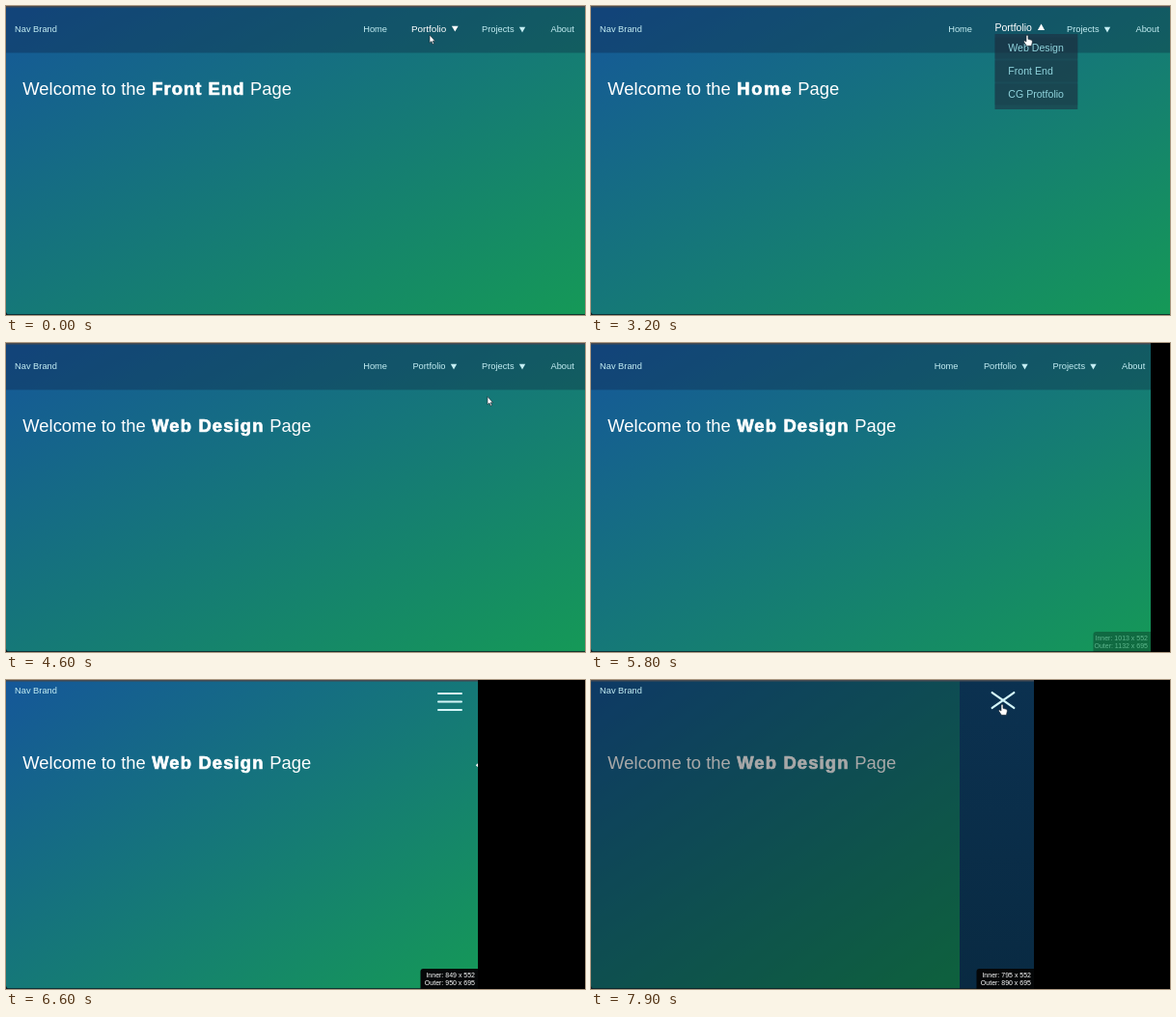
An HTML page that plays this animation: 600x320 px, repeating every 8 s.

```html
<!DOCTYPE html>
<html lang="en">
<head>
<meta charset="utf-8">
<title>Responsive navbar</title>
<style>
  html, body { margin: 0; width: 100%; height: 100%; overflow: hidden; background: #000; }
  svg { display: block; width: 600px; height: 320px; }
  text { font-family: "Liberation Sans", Arial, sans-serif; white-space: pre; }
  .link { font-size: 9.3px; fill: #c4eef4; }
  .sub { font-size: 10.6px; fill: #8fd3dc; }
  .title { font-size: 18.4px; fill: #fff; }
  .black { font-weight: 700; stroke: #fff; stroke-width: .7px; }
  .size { font-size: 7px; fill: #fff; text-anchor: end; }
</style>
</head>
<body>
<svg viewBox="0 0 600 320" id="stage">
  <defs>
    <linearGradient id="sky" x1="0" y1="0" x2="1" y2="1">
      <stop offset="0" stop-color="#155799"/><stop offset="1" stop-color="#159957"/>
    </linearGradient>
    <linearGradient id="navy" x1="0" y1="0" x2="0" y2="1">
      <stop offset="0" stop-color="#0b3150"/><stop offset="1" stop-color="#092a42"/>
    </linearGradient>
  </defs>
  <g id="page">
    <rect id="bg" height="320" fill="url(#sky)"/>
    <g class="title">
      <text x="17.3" y="92">Welcome to the </text>
      <text id="name" class="black" x="151.2" y="92"></text>
      <text id="tail" y="92">Page</text>
    </g>
    <rect id="shade" height="320" fill="#000"/>
    <rect id="panel" height="320" width="220" fill="url(#navy)"/>
    <rect id="bar" height="48.5" fill="#0c1432" fill-opacity=".3"/>
    <text id="brand" class="link" x="9">Nav Brand</text>
    <g id="drop">
      <rect x="418.5" y="29" width="85.8" height="78" fill="#20283c" fill-opacity=".55"/>
      <g id="rows"></g>
    </g>
    <g id="links"></g>
    <g id="burger" stroke="#d4f6f8" stroke-width="2" stroke-linecap="round">
      <path d="M-12 0H12"/><path d="M-12 0H12"/><path d="M-12 0H12"/>
    </g>
  </g>
  <rect id="blank" width="600" height="320" fill="#fdfcfe"/>
  <rect id="top" width="600" height="1.5" fill="#454a52"/>
  <path d="M0 319.2H600V320H0ZM0 316.5Q.4 319.4 3.5 320H0Z" fill="#0c1a22"/>
  <rect id="void" y="0" width="600" height="320" fill="#000"/>
  <g id="tip">
    <path d="M-59.5 320V302Q-59.5 299 -56.5 299H0V320Z" fill="#050708"/>
    <text id="inner" class="size" x="-3" y="308">Inner</text>
    <text id="outer" class="size" x="-3" y="316">Outer</text>
  </g>
  <path id="grip" d="M0 86.3L-2.2 88.3L0 90.3Z" fill="#fff"/>
  <g id="mouse" fill="#fff" stroke="#1c2530" stroke-width=".6" stroke-linejoin="round">
    <path id="arrow" d="M0 0V8.2L1.9 6.6L3.2 9.6L4.5 9L3.2 6.2H5.6Z"/>
    <path id="hand" d="M-1 .8Q0 -.6 1 .8V4.3L4.5 5.3Q5.5 5.8 5.3 7.4L4.4 11.3H-.6L-3.3 7.3Q-3.7 6 -2.3 6.1L-1 7.1Z"/>
  </g>
</svg>
<script>
const LOOP = 8000, STEP = 100;
const $ = id => document.getElementById(id);
const set = (el, attrs) => { for (const k in attrs) el.setAttribute(k, attrs[k]); };
const show = (el, on) => set(el, { visibility: on ? 'visible' : 'hidden' });
const make = (tag, attrs, parent, text = '') => {
  const el = document.createElementNS('http://www.w3.org/2000/svg', tag);
  set(el, attrs);
  el.textContent = text;
  parent.append(el);
  return el;
};

// Linear value at time t from rows of [time, value]
function at(rows, t) {
  let i = rows.findIndex(r => r[0] > t);
  if (i < 0) return rows[rows.length - 1][1];
  if (i === 0) return rows[0][1];
  const [t0, a] = rows[i - 1], [t1, b] = rows[i];
  return a + (b - a) * (t - t0) / (t1 - t0);
}
const smooth = u => u * u * (3 - 2 * u);

const tracks = {
  x: [[0, 439], [300, 420], [700, 385], [900, 381], [2000, 381], [2300, 395], [2700, 445],
      [3200, 452], [3500, 453], [4500, 453], [4700, 545], [4800, 580], [4900, 606],
      [7000, 456], [7500, 426]],
  y: [[0, 30], [300, 33], [700, 28], [2000, 28], [2300, 31], [2700, 30], [3200, 30],
      [3500, 41], [4500, 41], [4700, 70], [4800, 82], [4900, 88], [7000, 80], [7500, 25]],
  home: [[600, 0], [800, 1], [2200, 1], [2400, 0]],
  portfolio: [[0, .5], [200, 0], [2500, 0], [2700, 1]],
  drop: [[2700, 0], [3000, 1]],
  width: [[5200, 600], [5700, 590], [5800, 580], [5900, 555], [6000, 532], [6300, 508],
          [6600, 489], [6900, 460], [7000, 459]],
  layout: [[5200, 600], [5700, 594], [5800, 585.5], [5900, 563], [6000, 538], [6300, 513],
           [6600, 492], [6900, 461], [7000, 459]],
  tip: [[5700, 0], [5800, .3], [5900, 1]],
  shade: [[7500, 0], [7900, .34]],
  panel: [[7600, 0], [7900, 77]],
  cross: [[7500, 0], [7900, 1]]
};

const pages = {
  front: { name: 'Front End', gap: 1.05, tail: 253 },
  home: { name: 'Home', gap: 1.75, tail: 214.3 },
  web: { name: 'Web Design', gap: 1.15, tail: 273.3 }
};

// Label, left edge, centre and caret position, in a 600 px wide layout
const links = [
  ['Home', 370.2, 382.8], ['Portfolio', 421.4, 444.5, 464],
  ['Projects', 493, 516, 535], ['About', 564.5, 577]
].map(([label, left, mid, caret]) => {
  const g = make('g', {}, $('links'));
  const text = make('text', { class: 'link', x: left - mid, y: 3.3 }, g, label);
  const tri = caret && make('path', { fill: '#c4eef4' }, g);
  return { label, g, text, tri, mid, caret: caret - mid };
});

['Web Design', 'Front End', 'CG Protfolio'].forEach((label, i) => {
  const y = 32.5 + 24 * i;
  make('rect', { x: 418.5, y, width: 85.8, height: 22, fill: '#14303c', 'fill-opacity': .2 }, $('rows'));
  make('text', { class: 'sub', x: 432.3, y: y + 14.8 }, $('rows'), label);
});

function drawLinks(v, layout, open) {
  for (const { label, g, text, tri, mid, caret } of links) {
    const h = smooth(label === 'Home' ? v.home : label === 'Portfolio' ? v.portfolio : 0);
    const fill = h > .3 ? '#fff' : '#c4eef4';
    set(g, { transform: `translate(${mid + layout - 600} ${24 - 2 * h}) scale(${1 + .13 * h})` });
    text.style.fill = fill;
    if (!tri) continue;
    const up = open && label === 'Portfolio';
    set(tri, { fill, d: up ? `M${caret - 3.2} 2.6h6.4l-3.2 -5.6Z` : `M${caret - 3.2} -2.2h6.4l-3.2 5.6Z` });
  }
}

function drawBurger(layout, k) {
  set($('burger'), { transform: `translate(${layout - 32} ${22.5 - 1.5 * k}) scale(${1 + .15 * k})` });
  [...$('burger').children].forEach((line, i) => {
    const side = i - 1;
    set(line, {
      transform: `translate(0 ${8.5 * side * (1 - k)}) rotate(${-35 * side * k})`,
      opacity: side ? 1 : 1 - k
    });
  });
}

function render(t) {
  const v = {};
  for (const k in tracks) v[k] = at(tracks[k], t);
  if (t >= 3800) v.portfolio = v.drop = 0;
  const { width, layout } = v;
  const mobile = layout < 520;

  const page = pages[t < 1300 ? 'front' : t < 3800 ? 'home' : 'web'];
  $('name').textContent = page.name;
  $('name').style.letterSpacing = page.gap + 'px';
  set($('tail'), { x: page.tail });

  set($('bg'), { width: layout });
  set($('bar'), { width: layout });
  set($('shade'), { width: layout, 'fill-opacity': v.shade });
  set($('panel'), { x: layout - v.panel });
  set($('brand'), { y: mobile ? 14.2 : 27.3 });
  show($('bar'), !mobile);
  show($('links'), !mobile);
  show($('burger'), mobile);
  set($('drop'), { opacity: v.drop });
  drawLinks(v, layout, v.drop > 0);
  drawBurger(layout, smooth(v.cross));

  const blank = t >= 3800 && t < 4300;
  show($('blank'), blank);
  set($('top'), { fill: blank ? '#22262c' : '#454a52', height: blank ? 1 : 1.5 });
  set($('void'), { x: width });

  set($('tip'), { transform: `translate(${width} 0)`, opacity: v.tip });
  $('inner').textContent = `Inner: ${Math.round(795 + (width - 459) * 1.8)} x 552`;
  $('outer').textContent = `Outer: ${Math.round(890 + (width - 459) * 2)} x 695`;
  set($('grip'), { transform: `translate(${width} 0)` });
  show($('grip'), t >= 5900 && t < 7000);

  const hand = (t >= 800 && t < 2200) || (t >= 2700 && t < 3800) || t >= 7400;
  set($('mouse'), { transform: `translate(${v.x} ${v.y})` });
  const visible = t < 4900 || t >= 7000;
  show($('hand'), visible && hand);
  show($('arrow'), visible && !hand);
}

const start = performance.now();
function tick() {
  const t = (performance.now() - start) % LOOP;
  render(Math.floor(t / STEP) * STEP);
  requestAnimationFrame(tick);
}
tick();
</script>
</body>
</html>
```
